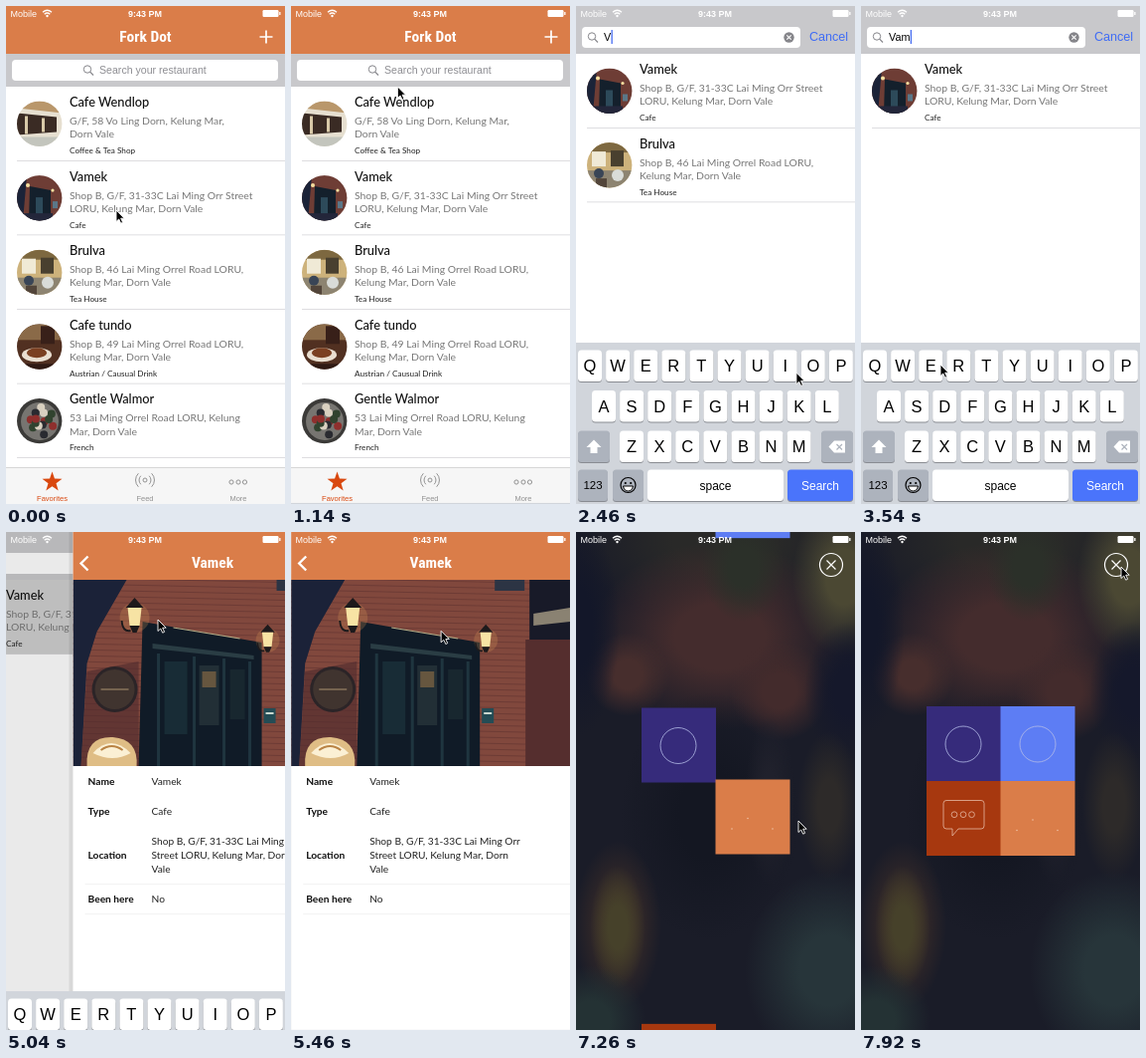
Animation of 281 by 500 pixels, one loop 8000 ms. Source, as an HTML page:

```html
<!DOCTYPE html>
<html lang="en">
<head>
<meta charset="utf-8">
<title>Restaurant finder</title>
<style>
  html, body { margin: 0; width: 100%; height: 100%; overflow: hidden; background: #fff; }
  svg { display: block; width: 100vw; height: 100vh; }
  text { font-family: "Liberation Sans", Arial, sans-serif; white-space: pre; }
  .body { font-family: Lato, "Open Sans", sans-serif; }
  .title { font-family: "Roboto Condensed", Roboto, sans-serif; font-weight: 600; }
</style>
</head>
<body>
<svg id="stage" viewBox="0 0 281 500"></svg>
<script>
const LOOP = 8000;
const ORANGE = '#da7d49';
const places = [
  { name: 'Cafe Wendlop', lines: ['G/F, 58 Vo Ling Dorn, Kelung Mar,', 'Dorn Vale'], type: 'Coffee & Tea Shop' },
  { name: 'Vamek', lines: ['Shop B, G/F, 31-33C Lai Ming Orr Street', 'LORU, Kelung Mar, Dorn Vale'], type: 'Cafe' },
  { name: 'Brulva', lines: ['Shop B, 46 Lai Ming Orrel Road LORU,', 'Kelung Mar, Dorn Vale'], type: 'Tea House' },
  { name: 'Cafe tundo', lines: ['Shop B, 49 Lai Ming Orrel Road LORU,', 'Kelung Mar, Dorn Vale'], type: 'Austrian / Causual Drink' },
  { name: 'Gentle Walmor', lines: ['53 Lai Ming Orrel Road LORU, Kelung', 'Mar, Dorn Vale'], type: 'French' }
];

// Markup helpers
const text = (x, y, s, size, fill, extra = '') =>
  `<text x="${x}" y="${y}" font-size="${size}" fill="${fill}" ${extra}>${s.replace('&', '&amp;')}</text>`;
const rect = (x, y, w, h, fill, extra = '') =>
  `<rect x="${x}" y="${y}" width="${w}" height="${h}" fill="${fill}" ${extra}/>`;
const circle = (x, y, r, fill, extra = '') => `<circle cx="${x}" cy="${y}" r="${r}" fill="${fill}" ${extra}/>`;
const path = (d, fill, extra = '') => `<path d="${d}" fill="${fill}" ${extra}/>`;
const line = (d, color, width = 1) => path(d, 'none', `stroke="${color}" stroke-width="${width}"`);
const group = (id, content, extra = '') => `<g id="${id}" ${extra}>${content}</g>`;
const MID = 'text-anchor="middle"';
const BODY = 'class="body"';

const lamp = (x, y, scale) => `<g transform="translate(${x} ${y}) scale(${scale})">` +
  circle(0, 1, 15, '#e7a65a', 'opacity=".22"') +
  path('M-9 -9L0 -19L9 -9Z', '#1d1a1c') + path('M-7 -9H7L5 9H-5Z', '#f7e3a4') +
  path('M-5 9H5L2 16H-2Z', '#1d1a1c') + line('M-4 14Q-12 16 -13 4', '#1d1a1c', 2) + '</g>';

const photo = () =>
  rect(0, 48, 281, 187, '#81483d') +
  Array.from({ length: 31 }, (_, i) => line(`M0 ${46 + i * 6}L281 ${52 + i * 6}`, '#6b3a35', .9)).join('') +
  path('M0 48H54L24 100L14 132L8 235H0Z', '#1b2238') +
  path('M14 140L66 130V235H8Z', '#4f2b2e', 'opacity=".6"') +
  path('M70 90L190 111V235H66Z', '#101b27') +
  path('M80 112L182 124V128L80 117Z', '#2a3d44') +
  line('M86 122V235M122 125V235M152 127V235M178 130V235', '#1f353f', 3) +
  rect(92, 130, 23, 73, '#182c36') + rect(127, 134, 20, 60, '#222f36') +
  rect(130, 140, 14, 16, '#66563f') + rect(158, 138, 15, 50, '#18272f') +
  line('M101 96L168 107', '#b9ae88', 1.2) +
  rect(240, 48, 41, 60, '#181a28') + rect(205, 48, 30, 11, '#2c3444') +
  path('M244 82L281 76V90L244 94Z', '#8a8272') + rect(236, 108, 45, 127, '#552e2e') +
  rect(192, 177, 12, 15, '#234c55') + rect(194, 181, 8, 2, '#c9d8cf') +
  circle(42, 158, 23, '#2b2427') + circle(42, 158, 20, '#40342f') + line('M28 158H56', '#75634f', 2) +
  lamp(62, 85, 1) + lamp(196, 108, .8) +
  path('M14 235Q12 205 40 206Q66 208 64 235Z', '#dfbd85') +
  path('M20 222Q38 202 58 222Q40 232 20 222Z', '#fbf0d4') + line('M28 219Q39 211 50 219', '#b98344', 2);

const avatarArt = [
  rect(0, 0, 46, 46, '#e6dfd0') + path('M0 0H46V12L0 7Z', '#b9976b') + path('M0 12L40 16V31L0 34Z', '#3a2b24') +
    rect(8, 15, 3, 18, '#d8c9a8') + rect(25, 17, 3, 14, '#d8c9a8') + rect(0, 36, 46, 10, '#c3c5bd'),
  rect(0, 0, 46, 46, '#6e3d35') + path('M0 0H10L6 46H0Z', '#1b2338') +
    path('M13 11L34 15V46H12Z', '#14202c') + rect(19, 22, 7, 22, '#2d4a5a') + rect(36, 26, 5, 7, '#5b7788') +
    circle(11, 10, 2, '#f5e0a0') + circle(36, 15, 1.6, '#f5e0a0') + rect(6, 38, 30, 8, '#23263a'),
  rect(0, 0, 46, 46, '#cdb27b') + rect(0, 0, 46, 10, '#7d6840') + rect(5, 9, 14, 15, '#f0ead6') + rect(24, 8, 13, 16, '#49402f') +
    rect(0, 28, 46, 18, '#8d8471') + circle(12, 31, 5, '#394556') + circle(31, 33, 6, '#d9dcd8') + rect(9, 36, 11, 10, '#52453a'),
  rect(0, 0, 46, 46, '#513021') + rect(0, 0, 46, 16, '#8a6a48') + rect(24, 2, 14, 18, '#382019') +
    '<ellipse cx="20" cy="31" rx="15" ry="7" fill="#e9ded0"/><ellipse cx="20" cy="29" rx="10" ry="5" fill="#7b4022"/>' +
    rect(0, 40, 46, 6, '#2f1a14'),
  rect(0, 0, 46, 46, '#3b3a38') + circle(23, 23, 19, '#777571') +
    Array.from({ length: 14 }, (_, i) => circle(23 + 14 * Math.cos(i * 2.4) * (i % 3 + 1) / 3,
      23 + 14 * Math.sin(i * 2.4) * (i % 3 + 1) / 3, 4, ['#8e2f2d', '#31432f', '#d9d0c0', '#292a30'][i % 4])).join('')
];

const row = (p, i) => group('row' + i,
  rect(0, 0, 281, 74.5, '#cfcfcf', `id="glow${i}" opacity="0"`) +
  `<g transform="translate(11 14.5)" clip-path="url(#round)">${avatarArt[i]}</g>` +
  text(64, 20, p.name, 12.8, '#111', `${BODY} font-weight="500"`) +
  p.lines.map((s, k) => text(64, 38 + k * 13.3, s, 10.4, '#777', BODY)).join('') +
  text(64, 67, p.type, 8.2, '#222', BODY) + rect(11, 74, 270, .6, '#c8c7cc'));

const navBar = (title, extra) => rect(0, 0, 281, 48, ORANGE) +
  text(140.5, 36, title, 15.5, '#fff', `class="title" ${MID}`) + extra;

function starPath(cx, cy, r) {
  return 'M' + Array.from({ length: 10 }, (_, i) => {
    const a = i * Math.PI / 5, q = i % 2 ? r * .4 : r;
    return `${cx + q * Math.sin(a)} ${cy - q * Math.cos(a)}`;
  }).join('L') + 'Z';
}
const wave = (r, side) => {
  const x = 140 + side * r * .7, dy = r * .71;
  return line(`M${x} ${476 - dy}A${r} ${r} 0 0 ${side > 0 ? 1 : 0} ${x} ${476 + dy}`, '#929292');
};

const tabBar = () => rect(0, 463, 281, 37, '#f6f6f6') + rect(0, 463, 281, .6, '#c4c4c4') +
  path(starPath(46.5, 478, 10.5), '#d9480f') + text(46.5, 497, 'Favorites', 7.5, '#d9480f', MID) +
  circle(140, 476, 2, 'none', 'stroke="#929292"') +
  [6, 9.5].map(r => wave(r, -1) + wave(r, 1)).join('') +
  text(140, 497, 'Feed', 7.5, '#929292', MID) +
  [227, 234, 240.5].map(x => circle(x, 478, 2.1, 'none', 'stroke="#929292"')).join('') +
  text(234, 497, 'More', 7.5, '#929292', MID);

const key = (x, y, w, label = '', fill = '#fff', size = 16.5, id = '') =>
  rect(x, y + 1, w, 31.5, '#898c92', 'rx="3.5"') + rect(x, y, w, 31.5, fill, `rx="3.5" id="${id}"`) +
  text(x + w / 2, y + 15.7 + size * .36, label, size, '#000', `${MID} id="${id}Label"`);
const keyRow = (letters, x, y) => [...letters].map((c, i) => key(x + i * 28.1, y, 24, c)).join('');

const keyboard = () => rect(0, 338, 281, 162, '#d1d5db') +
  keyRow('QWERTYUIOP', 2, 345.5) + keyRow('ASDFGHJKL', 16, 386) + keyRow('ZXCVBNM', 44, 426.5) +
  key(2, 426.5, 32, '', '#fff', 12, 'shift') +
  path('M18 435.5L25.5 443H21.5V449H14.5V443H10.5Z', '#000', 'id="arrow" stroke-linejoin="round"') +
  key(247, 426.5, 32, '', '#adb3bd') + path('M254.5 442.5L260 436.5H271V448.5H260Z', '#fff') +
  line('M262.5 440L268 445.5M268 440L262.5 445.5', '#adb3bd', 1.2) +
  key(2, 465.5, 30, '123', '#adb3bd', 11.5) + key(37, 465.5, 31, '', '#adb3bd') +
  circle(52.5, 481, 7.5, 'none', 'stroke="#000" stroke-width="1.2"') + circle(49.8, 479, 1.1, '#000') + circle(55.2, 479, 1.1, '#000') +
  path('M47.5 482H57.5Q56.5 487 52.5 487Q48.5 487 47.5 482Z', '#fff', 'stroke="#000"') +
  key(72, 465.5, 137, 'space', '#fff', 12) + key(213, 465.5, 66, 'Search', '#adb3bd', 12, 'search');

const lens = (x, y) => circle(x, y, 3.7, 'none', 'stroke="#85858a"') + line(`M${x + 2.7} ${y + 2.7}L${x + 6} ${y + 6}`, '#85858a', 1.2);

const searchBar = () => rect(0, 0, 281, 500, '#c8c8cb', 'id="barBack"') +
  group('bar', rect(6, 6, 268, 21, '#fff', 'rx="4" id="field"') +
    group('hint', lens(16, 15.5) + text(28, 20, 'Search your restaurant', 10.6, '#8e8e93', 'id="placeholder"')) +
    group('entry', text(28, 20, '', 10.8, '#000', 'id="typed"') + rect(50, 9, 1.3, 14, '#466cf2', 'id="caret"') +
      group('clear', circle(214.5, 16.5, 5.2, '#85858a') + line('M212.3 14.3L216.7 18.7M216.7 14.3L212.3 18.7', '#fff', 1.1))) +
    text(254.5, 20, 'Cancel', 12.6, '#3f6cf5', `${MID} id="cancel"`));

const label = (y, s) => text(15, y, s, 10.2, '#111', `${BODY} font-weight="700"`);
const value = (y, s) => text(79, y, s, 10.2, '#222', BODY);
const detail = () => rect(-4, 0, 4, 500, '#000', 'opacity=".08"') + rect(0, 0, 281, 500, '#fff') +
  `<g clip-path="url(#shot)">${photo()}</g>` + navBar('Vamek', line('M15 24.5L8 31.5L15 38.5', '#fff', 2.4)) +
  label(253.5, 'Name') + value(253.5, 'Vamek') + label(283.5, 'Type') + value(283.5, 'Cafe') +
  label(327.5, 'Location') + value(313.5, 'Shop B, G/F, 31-33C Lai Ming Orr') +
  value(327.5, 'Street LORU, Kelung Mar, Dorn') + value(341.5, 'Vale') +
  label(371.5, 'Been here') + value(371.5, 'No') +
  [353, 383].map(y => rect(12, y, 269, .6, '#ececec')).join('');

// Soft patches of the blurred backdrop: x, y, rx, ry, colour
const blobs = [
  [150, 10, 150, 80, '#292928'], [145, 105, 130, 95, '#442c2d'], [168, 35, 42, 55, '#2b3029'],
  [205, 160, 50, 50, '#432b2c'], [52, 143, 42, 42, '#472e2d'], [270, 45, 52, 80, '#4b4833'],
  [2, 95, 42, 110, '#131729'], [275, 160, 45, 70, '#15182b'], [135, 285, 90, 125, '#141722'],
  [255, 275, 32, 75, '#2d2a29'], [42, 395, 44, 85, '#392b28'], [42, 397, 28, 62, '#46412a'],
  [255, 440, 85, 100, '#27353a'], [15, 490, 55, 55, '#243234'], [195, 270, 25, 85, '#20212c']
];
const tile = (id, x, y, fill, icon) => group(id, rect(x, y, 75, 75, fill) + icon);
const ring = (x, y) => circle(x, y, 18, 'none', 'stroke="#b4bce8" stroke-width=".8"');
const bubble = path('M86 269.5H121Q124 269.5 124 272.5V295Q124 298 121 298H98L92 305V298H86Q83 298 83 295V272.5Q83 269.5 86 269.5Z',
  'none', 'stroke="#e6b9a4" stroke-width=".8"') +
  [94, 103, 111.5].map(x => circle(x, 283.7, 2.9, 'none', 'stroke="#e6b9a4" stroke-width=".8"')).join('');
const dots = [[173, 289], [157, 299.5], [198, 299.5]].map(([x, y]) => circle(x, y, .7, '#f3cdb4')).join('');

const sheet = () => rect(0, 0, 281, 500, '#1a1c28') +
  blobs.map(([x, y, rx, ry], i) => `<ellipse cx="${x}" cy="${y}" rx="${rx}" ry="${ry}" fill="url(#blob${i})"/>`).join('') +
  circle(257, 33, 11.5, 'none', 'stroke="#fff" stroke-width="1.2"') + line('M252.5 28.5L261.5 37.5M261.5 28.5L252.5 37.5', '#fff', 1.2) +
  tile('tileA', 66, 175, '#362b7b', ring(103, 213)) + tile('tileB', 140.5, 175, '#5d7df4', ring(178, 213)) +
  tile('tileC', 66, 250, '#a7380f', bubble) + tile('tileD', 140.5, 250, ORANGE, dots);

const statusBar = () => text(4.5, 11, 'Mobile', 9, '#fff') + text(140, 11, '9:43 PM', 9, '#fff', `${MID} font-weight="700"`) +
  line('M37 6.3Q41.5 2.3 46 6.3M38.7 8.3Q41.5 5.8 44.3 8.3', '#fff', 1.3) + circle(41.5, 10, 1.2, '#fff') +
  rect(258.5, 4, 16, 7, '#fff', 'rx="1.2"') + rect(275.2, 6, 1.3, 3, '#fff');

document.getElementById('stage').innerHTML =
  `<defs><clipPath id="round"><circle cx="22.7" cy="22.7" r="22.7"/></clipPath>
   <clipPath id="shot"><rect y="48" width="281" height="187"/></clipPath>` +
  blobs.map((b, i) => `<radialGradient id="blob${i}"><stop offset=".35" stop-color="${b[4]}"/>` +
    `<stop offset="1" stop-color="${b[4]}" stop-opacity="0"/></radialGradient>`).join('') + '</defs>' +
  group('home', rect(0, 0, 400, 500, '#fff') + places.map(row).join('') + group('tabs', tabBar()) + searchBar() +
    group('nav', navBar('Fork Dot', line('M262 24.5V37.5M255.5 31H268.5', '#fff', 1.7)))) +
  rect(0, 0, 281, 500, '#000', 'id="dim"') + group('detail', detail()) + group('keys', keyboard()) +
  group('sheet', sheet()) + statusBar() +
  group('cursor', path('M0 0V11.5L2.7 9L4.7 13.2L6.6 12.3L4.7 8.2H8.2Z', '#000', 'stroke="#fff" stroke-width=".9"'));

// Motion
const $ = Object.fromEntries([...document.querySelectorAll('[id]')].map(e => [e.id, e]));
const clamp = x => Math.min(1, Math.max(0, x));
const span = (t, start, length) => clamp((t - start) / length);
const mix = (a, b, p) => a + (b - a) * p;
const smooth = x => x * x * (3 - 2 * x);
const easeInOut = x => x < .5 ? 4 * x ** 3 : 1 - (2 - 2 * x) ** 3 / 2;
const move = (e, x, y) => e.setAttribute('transform', `translate(${x} ${y})`);
const set = (e, attrs) => { for (const k in attrs) e.setAttribute(k, attrs[k]); };
const show = (e, on) => { e.style.display = on ? '' : 'none'; };

// Critically damped slide, 0 to 1
function settle(t, start) {
  const x = Math.max(0, t - start) * .01625;
  return x > 12 ? 1 : 1 - (1 + x) * Math.exp(-x);
}
// Underdamped spring, 1 to 0
function spring(t, start) {
  const s = Math.max(0, t - start) / 1000;
  return Math.exp(-9.6 * s) * (Math.cos(7.2 * s) + 4 / 3 * Math.sin(7.2 * s));
}

const cursorStops = [
  [60, 111, 205], [660, 104, 66], [1080, 104, 66], [1500, 163, 328], [1860, 164, 390], [1920, 164, 402], [2160, 164, 402],
  [2580, 236, 360], [2760, 236, 360], [3060, 224, 440], [3180, 224, 440], [3540, 80, 360], [3660, 80, 360],
  [3900, 19, 466], [4440, 151, 90], [5040, 153, 88], [5400, 153, 88], [6000, 88, 480], [6420, 88, 480],
  [7260, 224, 290], [7780, 258, 34], [7920, 262, 35]
];
function cursorAt(t) {
  const i = cursorStops.findIndex(s => s[0] > t);
  if (i === 0) return cursorStops[0].slice(1);
  if (i < 0) return cursorStops.at(-1).slice(1);
  const [a, b] = [cursorStops[i - 1], cursorStops[i]];
  const p = smooth(span(t, a[0], b[0] - a[0]));
  return [mix(a[1], b[1], p), mix(a[2], b[2], p)];
}

const keyTimes = [2160, 2760, 3240, 3720];

function render(t) {
  const open = easeInOut(span(t, 1200, 420));
  const rise = 1 - (1 - span(t, 1140, 450)) ** 3;
  const push = settle(t, 4872);
  const modal = settle(t, 6133);
  const query = 'Vamek'.slice(0, keyTimes.filter(k => t >= k).length);

  // List and filter
  let index = 0;
  places.forEach((p, i) => {
    const hit = p.name.toLowerCase().includes(query.toLowerCase());
    show($['row' + i], hit);
    $['row' + i].setAttribute('opacity', query ? 1 : 1 - span(t, 1200, 240));
    if (hit) move($['row' + i], 0, 81 - 33 * open + 74.6 * index++);
  });
  $.glow1.setAttribute('opacity', t >= 4600 ? 1 : 0);
  show($.tabs, rise < .9);

  // Search bar
  move($.nav, 0, -48 * open);
  set($.barBack, { y: 48 * (1 - open), height: 33 + 15 * open });
  move($.bar, 0, 48 - 33 * open);
  $.field.setAttribute('width', 268 - 48 * open);
  move($.hint, 66 * (1 - open), 0);
  $.cancel.setAttribute('x', 254.5 + 48 * (1 - open));
  show($.placeholder, !query);
  $.typed.textContent = query;
  show($.entry, query);
  if (query) $.caret.setAttribute('x', 28.3 + $.typed.getComputedTextLength());

  // Keyboard
  $.shift.setAttribute('fill', query ? '#adb3bd' : '#fff');
  $.arrow.setAttribute('fill', query ? '#fff' : '#000');
  $.search.setAttribute('fill', query ? '#4a74fb' : '#adb3bd');
  $.searchLabel.setAttribute('fill', query ? '#fff' : '#7d828b');
  move($.keys, 0, 162 * (1 - rise + push));

  // Pages
  move($.home, -84.3 * push, 0);
  $.dim.setAttribute('opacity', .11 * push);
  move($.detail, 281 * (1 - push), 0);
  show($.detail, push > 0);
  move($.sheet, 0, 500 * (1 - modal));
  show($.sheet, modal > 0);

  // Tiles drop in as two diagonal pairs
  const first = 500 * spring(t, 6620), second = 500 * spring(t, 7133);
  move($.tileA, 0, -first);
  move($.tileD, 0, first);
  move($.tileB, 0, -second);
  move($.tileC, 0, second);
  for (const id of ['tileA', 'tileD']) show($[id], t > 6620);
  for (const id of ['tileB', 'tileC']) show($[id], t > 7133);

  move($.cursor, ...cursorAt(t));
}

const began = performance.now();
function tick() {
  render((performance.now() - began) % LOOP);
  requestAnimationFrame(tick);
}
tick();
</script>
</body>
</html>
```
